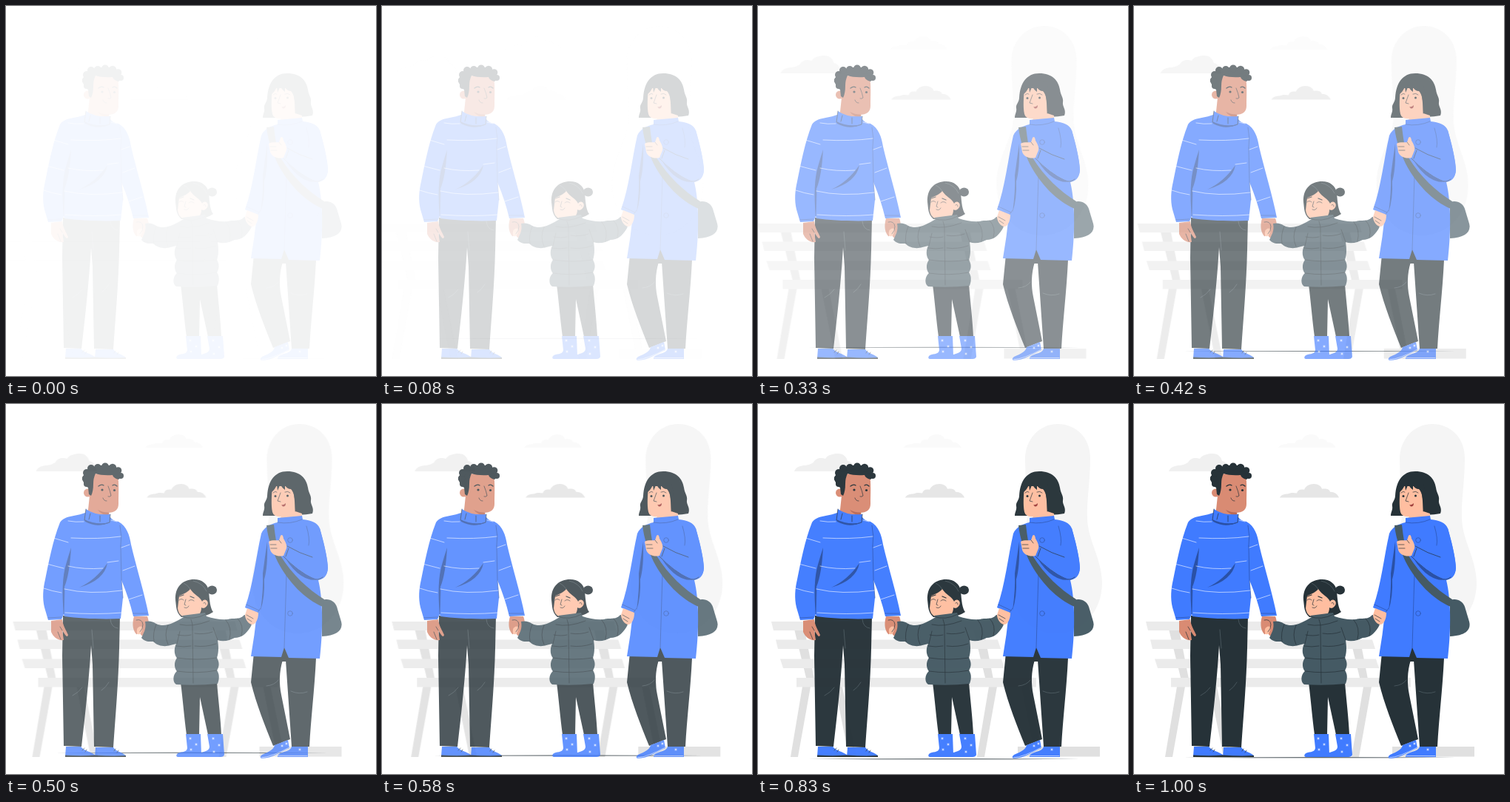
Animation, 500 px wide and 500 px high, one loop 1040 ms. Source, as an HTML page:

```html
<!DOCTYPE html>
<html lang="en">
<head>
<meta charset="utf-8">
<title>Family outdoors</title>
<style>
html, body { margin: 0; height: 100%; overflow: hidden; background: #fff; }
svg { display: block; width: 100vw; height: 100vh; }
.dark { fill: #263238; }
.blue { fill: #407bff; }
.navy { fill: #2a51a6; }
.slate { fill: #455a64; }
.tan { fill: #d98b73; }
.peach { fill: #ffbea0; }
.line { fill: none; stroke: #263238; stroke-width: .7; stroke-linecap: round; stroke-linejoin: round; }
.brow { stroke-width: 1.3; }
.fold { fill: none; stroke: #2a51a6; stroke-width: .7; stroke-linecap: round; }
.crease { fill: none; stroke: #5b6a71; stroke-width: .6; stroke-linecap: round; }
.white { fill: none; stroke: #fff; stroke-width: .6; stroke-linecap: round; }
</style>
</head>
<body>
<svg viewBox="0 0 500 500">
<defs>
  <path id="cloud" d="M0 20C2 16 7 15 11 15C14 13 19 13 23 14C24 10 27 8 33 9C35 4 40 1 46 1C52 1 56 4 57 8C62 7 67 8 68 12C74 12 78 15 80 20Z"/>
  <path id="support" d="M46 300H60L76 382H66Z"/>
  <path id="legs" d="M58 382H69L52 477H42ZM102 382H112L131 477H121Z"/>
  <path id="flake" class="white" d="M-1.300 0H1.300M-.7-1.200L.7 1.200M.7-1.200L-.7 1.200"/>
</defs>

<g id="scene">
  <path fill="#f5f5f5" d="M359 75C359 48 378 27 403 27C428 27 447 46 447 73C447 105 442 130 443 155C444 185 463 210 463 242C463 280 436 310 401 310C366 310 339 282 339 240C339 205 361 180 362 150C362 125 359 100 359 75Z"/>
  <path fill="#f0f0f0" d="M47 91C49 85 56 83 62 83C67 82 70 81 73 79C76 73 83 72 89 74C92 69 99 67 106 67C114 67 118 72 119 77C125 78 128 83 129 91Z"/>
  <use href="#cloud" fill="#e6e6e6" transform="translate(197 107)scale(1 .97)"/>
  <use href="#cloud" fill="#fafafa" transform="translate(195 40)scale(.97 .95)"/>
  <g fill="#e0e0e0">
    <use href="#support"/><use href="#support" x="242"/>
    <use href="#legs"/><use href="#legs" x="252"/>
    <path d="M349 463H460V476.500H349Z"/>
  </g>
  <path fill="#ebebeb" d="M16 294H316L319 306H19ZM22 318.500H322L326 331H25ZM28 344.500H327L331 357H32ZM50 370H374V382.500H50Z"/>
</g>

<path id="floor" class="dark" d="M67 477.700Q251 476.700 435 477.700Q251 478.700 67 477.700Z"/>

<g id="family">
  <!-- man -->
  <path class="dark" d="M77 286H154L153 330C152 375 148 420 145 464L119 463L117 352L115 326C112 375 107 420 102 463L78 462L76 340Z"/>
  <path class="crease" d="M90 394Q98 390 103 383M129 387Q135 383 139 376M118 330L116 305M141 291Q142 302 151 303"/>
  <path class="blue" d="M81 463H101C106 469 115 470 120 474V476H80ZM121 464H145C149 470 158 471 162 475V477H120Z"/>
  <path class="dark" d="M80 474.500Q102 476 120 474.500V477H80ZM120 474.500Q143 476 162 475V477H120Z"/>
  <path class="line" d="M103 468L106 465M107 470L109 467M146 469L148 466M150 471L152 468"/>
  <path class="tan" d="M61 293L76 291C77 300 81 305 84 312Q83 316 80 312L76 306L78 319C70 320 64 315 61 308Z"/>
  <path class="line" d="M76 306L73 301M70 308L74 318"/>
  <path class="tan" d="M117 94L151 96C153 108 152 122 152 135C152 143 147 147 137 147L140 153L110 152L113 124Z"/>
  <circle class="tan" cx="110.500" cy="120" r="5.500"/>
  <path fill="#b96a55" d="M124 143Q132 147 139 146.500L140 151Q129 150 124 143Z"/>
  <g class="dark">
    <path d="M103 99L110 89L124 83L146 83L157 97L152 102Q145 100 144 96Q130 97 121 94Q118 100 118 108Q118 118 115 124L112 122L111 113L106 110Z"/>
    <circle cx="107.500" cy="101" r="4.700"/><circle cx="109" cy="93" r="5"/><circle cx="115" cy="87" r="5"/>
    <circle cx="124" cy="86" r="5"/><circle cx="134" cy="84.500" r="5"/><circle cx="144" cy="86" r="5.200"/>
    <circle cx="151.500" cy="90" r="4.800"/><circle cx="155" cy="97" r="4"/><circle cx="109" cy="108" r="4"/>
    <circle cx="130" cy="116" r="1.600"/><circle cx="146.500" cy="116.500" r="1.600"/>
  </g>
  <path class="line brow" d="M125 111Q129 108 132 110M144 110Q147 108 150 111"/>
  <path class="line" d="M138 111Q141 118 142 124Q140 126 138 125M131 127Q132 131 136 131"/>
  <path class="blue" d="M107 147C95 152 80 150 73 160C63 185 58 213 53 237C50 250 49 262 52 275L57 292L75 291L78 284L79 287C100 290 130 291 155 290L158 262L156 238C163 255 168 270 172 287L193 286C187 255 176 220 169 190C167 177 163 165 152 159C146 158 143 156 141 153Z"/>
  <path class="navy" d="M88 194Q86 230 79 247L78 285Q74 240 81 217Q84 206 88 194ZM137 215Q133 238 99 248Q121 238 137 215Z"/>
  <path class="fold" d="M155 192L156 238L158 262M154 164Q157 178 155 192M79 252L78 284M57 289L75 288M172 283L191 283"/>
  <path class="white" d="M84 158Q94 160 105 159M142 157L150 159M64 181Q74 184 84 187M88 181Q125 183 155 179M156 194L167 190M55 216Q66 219 78 222M84 219Q105 224 131 222M137 214L152 212M158 225L174 219M51 249Q62 253 75 255M79 250Q112 258 157 252M166 264L184 258M80 282Q120 285 157 282"/>
  <path class="blue" d="M108 142Q121 151 141 149L140 160Q124 167 106 157Z"/>
  <path class="line" d="M141 149L140 160Q124 167 106 157L108 142M114 148L112 156M127 151V159"/>
  <path class="navy" d="M106 156Q122 164 140 160Q124 168 107 159Z"/>

  <!-- girl -->
  <path class="dark" d="M236 376H285C287 400 290 425 291 447H273L262 396L261 447H244C241 425 239 400 236 376Z"/>
  <path class="blue" d="M243 446H263L264 474Q264 477 260 477H232Q229 476 231 473C235 469 244 472 245 465ZM272 446H293L295 474Q294 477 290 477H262Q259 476 262 472C268 469 275 469 275 463Z"/>
  <use href="#flake" x="249" y="452"/><use href="#flake" x="257" y="460"/><use href="#flake" x="250" y="467"/>
  <use href="#flake" x="280" y="452"/><use href="#flake" x="288" y="461"/><use href="#flake" x="281" y="470"/>
  <ellipse class="dark" cx="278.500" cy="251.500" rx="6.500" ry="6"/>
  <path class="dark" d="M229 265C228 246 240 237 254 237C265 237 272 243 274 252C275 266 276 276 280 281C273 286 264 287 259 286L237 288Q231 283 230 274Z"/>
  <path class="peach" d="M234 259C240 257 246 254 249 250C254 258 263 261 265 267C269 261 275 267 272 272C269 277 265 276 264 275C264 283 260 289 248 289C238 289 233 284 232 276Z"/>
  <path class="line brow" d="M234 260L240 258M249 260L254 262"/>
  <path class="line" d="M234 265Q237 262 240 265M247 266Q250 263 254 266M243 264L241 271L243 272M241 275Q245 277 247 273M267 269Q270 267 270 271"/>
  <path class="crease" d="M253 239Q266 242 271 253M249 250Q245 244 240 242"/>
  <path class="tan" d="M173 287H191C194 294 193 303 189 309C185 315 182 314 181 308L181 301L177 306Q179 312 176 311C170 304 171 294 173 287Z"/>
  <path class="peach" d="M177 304Q180 299 184 301Q185 306 181 311Q176 313 177 304Z"/>
  <path class="line" d="M176 292Q184 290 185 298Q185 304 181 308"/>
  <path class="slate" d="M240 288C228 295 215 303 203 297Q196 292 188 294C190 304 186 309 183 316C188 322 195 321 199 321C206 328 216 328 222 326L230 324C226 332 228 340 231 343C226 350 228 358 231 361C225 366 225 376 230 379Q258 381 286 378C289 370 288 364 285 360C289 354 288 348 285 343C288 335 287 326 286 319C294 322 303 319 309 316C318 316 324 311 330 302C334 296 333 289 329 286L322 285C315 293 306 288 300 291Q285 292 271 287L269 282L238 286Z"/>
  <path class="line" d="M237 287Q253 293 270 284M235 298Q252 302 275 293M250 291Q253 298 252 305L253 377M231 324L235 307M286 319L280 302M230 327Q240 329 250 327M255 327Q270 329 284 324M231 343Q258 347 285 343M231 361Q258 365 285 360M203 298Q198 309 200 321M219 299Q213 312 219 325M297 292Q306 302 302 318M313 290Q322 299 318 313M232 312Q242 314 250 312M255 310Q268 312 279 308"/>

  <!-- woman -->
  <path class="dark" d="M335 336H419V343C417 385 412 425 410 463H386L378 346L376 325L374 346C369 362 369 378 372 393L384 453L361 462C350 435 338 405 331 376Z"/>
  <path class="dark" d="M370 328H384L380 348H373Z"/>
  <path class="crease" d="M385 388Q396 393 407 389M352 381Q363 380 368 373"/>
  <path class="blue" d="M363 461L381 454L383 465C372 469 360 479 345 479Q342 477 346 474C355 470 362 467 363 461ZM386 463H408V477H367C366 474 370 472 376 470Q385 468 386 463Z"/>
  <path class="white" d="M345 478Q359 477 383 464M367 475.500H407"/>
  <use href="#flake" x="373" y="462"/><use href="#flake" x="379" y="459"/><use href="#flake" x="397" y="467"/>
  <path class="dark" d="M347 151C347 146 350 143 349 138C348 133 353 130 353 124C354 104 363 91 380 91C398 91 406 101 408 113C409 121 413 124 412 130C411 136 417 140 414 148Q400 151 385 149L362 151Z"/>
  <path class="peach" d="M360 111H386C390 120 390 132 391 145L400 148V156L368 157L372 152Q362 153 360 146C358 137 359 122 360 111Z"/>
  <path class="dark" d="M358 106L368 97L390 103L395 124L390 128Q389 119 385 115Q380 115 377 110L377 116Q372 113 370 106Q370 112 367 117L366 109Q364 115 359 119Z"/>
  <g class="dark"><circle cx="364" cy="124.500" r="1.500"/><circle cx="380.500" cy="124" r="1.500"/></g>
  <path class="line" d="M361 120Q364 117 366 119M377 119Q381 117 384 120M371 120L367 131L371 132M391 126L391 145"/>
  <path fill="#9f3f3c" d="M372 136Q375 137 378 134Q378 139 374 138.500Z"/>
  <path class="slate" d="M427 265C436 262 444 266 447 274L453 294C456 306 447 313 427 314Z"/>
  <path class="blue" d="M367 154L400 151L401 156C412 157 421 160 424 168C429 185 434 205 435 222C434 232 430 236 422 238C428 262 429 302 424 344L382 343L376 329L372 342L331 341Q336 312 339 283L323 275C334 245 338 205 345 175C349 166 358 162 367 160Z"/>
  <path class="navy" d="M353 186Q354 220 349 237Q350 260 344 279Q348 250 347 229Q350 206 353 186Z"/>
  <path class="fold" d="M379 230L376 329M367 160Q384 163 400 156M325 271L342 279M339 283L344 276M406 165Q411 182 409 191"/>
  <path class="slate" d="M352 164L362 163C364 180 366 195 371 205C388 232 408 250 430 264L428 274C404 264 381 240 367 213C360 198 354 182 352 164Z"/>
  <path class="blue" d="M379 192C393 199 407 206 414 207L409 172L424 168C430 190 435 210 435 222C434 235 425 240 415 236C400 230 386 218 375 206Z"/>
  <path class="line" d="M380 192Q397 202 414 207M375 206Q394 226 415 236Q422 239 428 234M382 195L378 206"/>
  <path class="navy" d="M378 209Q398 230 420 237Q412 240 399 232Q387 224 378 209Z"/>
  <circle class="fold" cx="384" cy="184" r="3.300"/><circle class="fold" cx="384" cy="283" r="3.300"/>
  <path class="peach" d="M355 186C360 183 366 185 369 184L371 178Q374 175 375 182C378 187 380 191 379 195L375 205C368 207 359 204 357 197Z"/>
  <path class="line" d="M369 184L372 188M357 190L365 190M358 195L366 195"/>
  <path class="peach" d="M326 276L341 282C341 290 338 298 332 298C327 297 323 290 323 285Z"/>
  <path class="line" d="M325 285L334 290M326 290L332 294"/>
</g>
</svg>
<script>
const LOOP = 1040, STEPS = 25, TRAVEL = 30;
const [scene, floor, family] = ["scene", "floor", "family"].map(id => document.getElementById(id));

// One coordinate of a cubic Bézier from 0 to 1 with handles a and b.
const bezier = (a, b, s) => 3 * a * s * (1 - s) ** 2 + 3 * b * s * s * (1 - s) + s ** 3;

// Slide-in easing with a slight overshoot.
function overshoot(x) {
  let lo = 0, hi = 1;
  for (let i = 0; i < 30; i++) {
    const mid = (lo + hi) / 2;
    if (bezier(.36, .5, mid) < x) lo = mid; else hi = mid;
  }
  return bezier(-.01, 1.38, hi);
}

function draw() {
  const t = performance.now() % LOOP;
  const step = Math.min(STEPS - 1, Math.floor((t + 4) * 24 / 1000));
  const x = (step + 1) / STEPS;
  const slide = overshoot(x), offset = TRAVEL * (slide - 1);
  const fade = Math.max(0, Math.min(1, slide));
  scene.setAttribute("transform", `translate(${offset} 0)`);
  floor.setAttribute("transform", `translate(0 ${offset})`);
  scene.setAttribute("opacity", fade);
  floor.setAttribute("opacity", fade);
  family.setAttribute("opacity", Math.sin(x * Math.PI / 2));
  requestAnimationFrame(draw);
}
draw();
</script>
</body>
</html>
```
